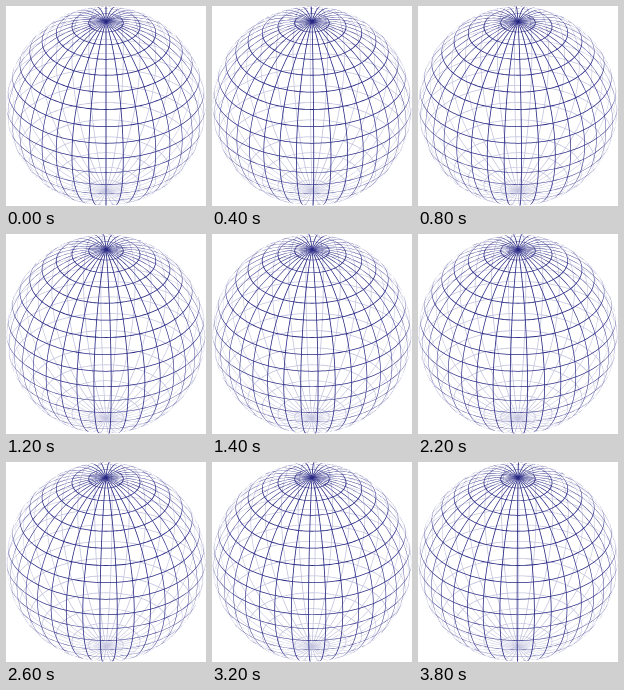
An HTML page with a canvas for the animation above (4000 ms loop, 200x200 px).

```html
<!DOCTYPE html>
<html lang="en">
<head>
<meta charset="utf-8">
<title>Rotating wireframe sphere</title>
<style>
  html, body { margin: 0; width: 100%; height: 100%; overflow: hidden; background: #fff; }
  canvas { display: block; width: 200px; height: 200px; }
</style>
</head>
<body>
<canvas id="globe"></canvas>
<script>
const SIZE = 200, RADIUS = 99.5, LINE = 0.82 / RADIUS;
const LOOP = 4000, STEP = 200, GRID = 10, SEGMENT = 2;
const FRONT = 'rgb(40,40,132)', BACK = 'rgb(196,196,222)';
const rad = deg => deg * Math.PI / 180;
const tiltSin = Math.sin(rad(32)), tiltCos = Math.cos(rad(32));

const canvas = document.getElementById('globe');
const ctx = canvas.getContext('2d');
const dpr = window.devicePixelRatio || 1;
canvas.width = canvas.height = SIZE * dpr;
ctx.scale(dpr, dpr);

function onSphere(lat, lon) {
  const c = Math.cos(lat);
  return [c * Math.sin(lon), Math.sin(lat), c * Math.cos(lon)];
}

const depth = p => p[1] * tiltSin + p[2] * tiltCos;

function project(p, n, side) {
  const [x, y, z] = p.map((v, i) => v + n[i] * side * LINE / 2);
  return [SIZE / 2 + RADIUS * x, SIZE / 2 - RADIUS * (y * tiltCos - z * tiltSin)];
}

// Lines are bands lying on the surface, so they get thinner towards the rim.
function band(at, from, to) {
  const front = new Path2D(), back = new Path2D();
  for (let a = from; a < to; a += SEGMENT) {
    const [p, n] = at(rad(a)), [q, m] = at(rad(a + SEGMENT));
    const [mid] = at(rad(a + SEGMENT / 2));
    const path = depth(mid) > 0 ? front : back;
    path.moveTo(...project(p, n, -1));
    path.lineTo(...project(q, m, -1));
    path.lineTo(...project(q, m, 1));
    path.lineTo(...project(p, n, 1));
    path.closePath();
  }
  return { front, back };
}

function meridian(lon) {
  const normal = [Math.cos(lon), 0, -Math.sin(lon)];
  return band(lat => [onSphere(lat, lon), normal], -90, 90);
}

function parallel(lat) {
  return band(lon => [onSphere(lat, lon), onSphere(lat + Math.PI / 2, lon)], 0, 360);
}

const parallels = [];
for (let lat = -80; lat <= 80; lat += GRID) parallels.push(parallel(rad(lat)));

function draw(turn) {
  const lines = [...parallels];
  for (let lon = 0; lon < 360; lon += GRID) lines.push(meridian(rad(lon + turn)));
  ctx.fillStyle = '#fff';
  ctx.fillRect(0, 0, SIZE, SIZE);
  ctx.fillStyle = BACK;
  lines.forEach(line => ctx.fill(line.back));
  ctx.fillStyle = FRONT;
  lines.forEach(line => ctx.fill(line.front));
}

let shown = -1;
function tick() {
  const step = Math.floor(performance.now() % LOOP / STEP);
  if (step !== shown) {
    shown = step;
    draw(step * STEP / LOOP * GRID);
  }
  requestAnimationFrame(tick);
}
tick();
</script>
</body>
</html>
```
